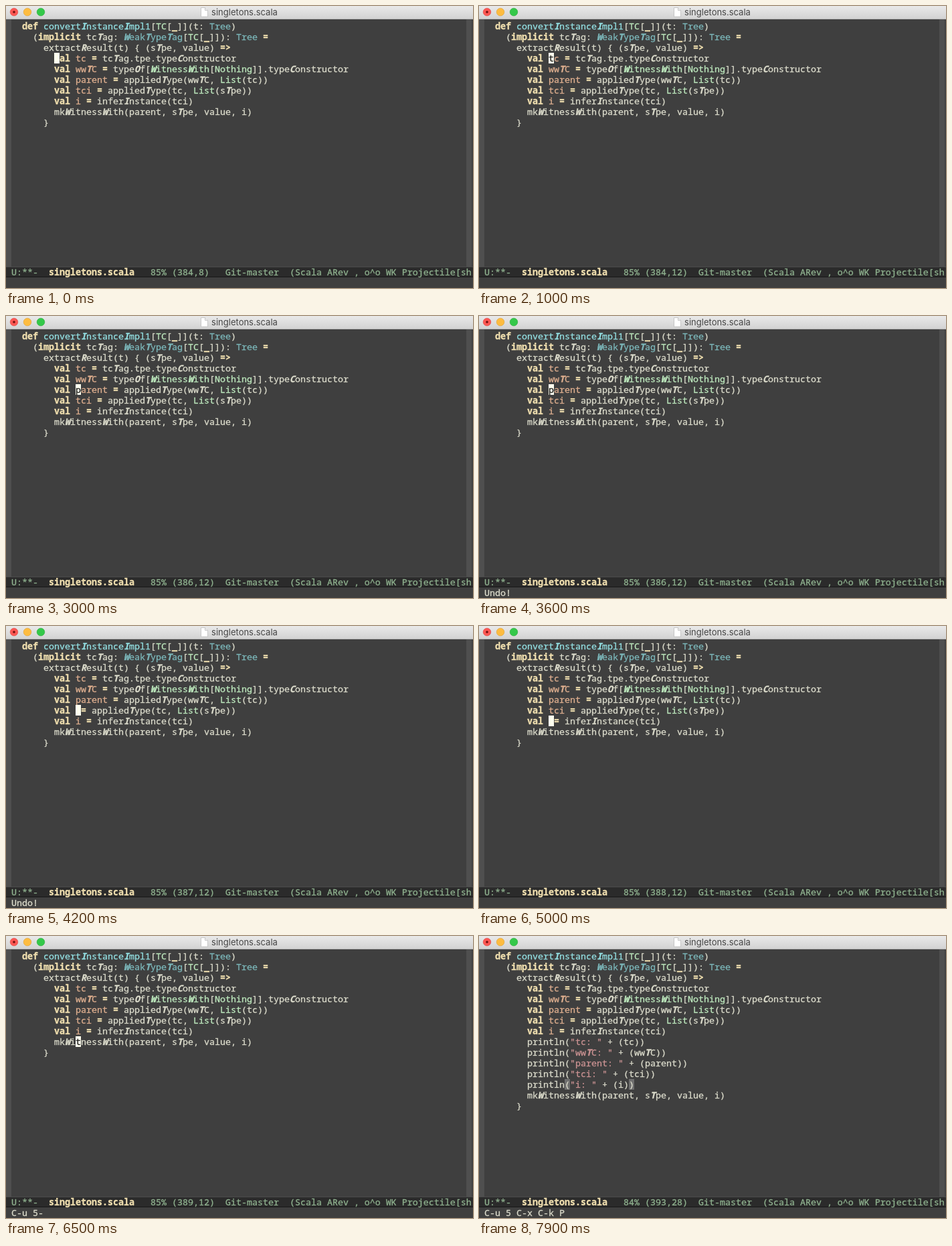
These frames come from a looping animation (698 px wide and 422 px high, 8000 ms). An HTML page:

```html
<!DOCTYPE html>
<html lang="en">
<head>
<meta charset="utf-8">
<title>singletons.scala</title>
<style>
html, body { margin: 0; width: 100%; height: 100%; overflow: hidden; background: #3f3f3f; }
svg { display: block; }
#screen text {
  font: 13.333px "Noto Sans Mono", "DejaVu Sans Mono", monospace;
  white-space: pre; color: #dcdccc;
  fill: currentColor; stroke: currentColor; stroke-width: .3;
}
#screen .k { color: #f0dfaf; font-weight: 700; }
#screen .f { color: #93e0e3; }
#screen .t { color: #7cb8bb; }
#screen .c { color: #bfebbf; }
#screen .v { color: #dfaf8f; }
#screen .s { color: #cc9393; }
#screen .g { font-weight: 700; font-style: italic; }
#screen .m { color: #8fb28f; }
#screen .cur { color: #1c1c1c; }
#screen .k.cur { color: #ffffef; }
.title { font: 13px Inter, Roboto, sans-serif; fill: #454545; }
</style>
</head>
<body>
<svg width="698" height="422" viewBox="0 0 698 422">
  <defs>
    <linearGradient id="bar" x2="0" y2="1">
      <stop stop-color="#e9e9e9"/><stop offset="1" stop-color="#d2d2d2"/>
    </linearGradient>
  </defs>
  <rect width="698" height="422" fill="#3f3f3f"/>
  <path d="M0 20h8v370h-8zM688 20h8v370h-8z" fill="#4f4f4f"/>
  <rect width="698" height="20" fill="url(#bar)"/>
  <rect y="19" width="698" height="1" fill="#b4b4b4"/>
  <g stroke-width=".6">
    <circle cx="12" cy="9" r="5.8" fill="#fc5753" stroke="#df4744"/>
    <circle cx="32" cy="9" r="5.8" fill="#fdbc40" stroke="#de9f34"/>
    <circle cx="52" cy="9" r="5.8" fill="#34c84a" stroke="#27aa35"/>
  </g>
  <circle cx="12" cy="9" r="1.8" fill="#6b0f0c"/>
  <path d="M291.5 2.5h6l4 4v9.5h-10z" fill="#fff" stroke="#bdbdbd" stroke-width=".8"/>
  <path d="M297.5 2.5v4h4" fill="#eee" stroke="#bdbdbd" stroke-width=".8"/>
  <text class="title" x="356.5" y="14" text-anchor="middle">singletons.scala</text>
  <rect y="390" width="698" height="16" fill="#2b2b2b"/>
  <rect y="390" width="698" height="1" fill="#4b4b4b"/>
  <rect y="405" width="698" height="1" fill="#171717"/>
  <g id="screen"></g>
</svg>
<script>
const LOOP = 8000, CELL = 8, ROW = 16, LEFT = 8, TOP = 22, FIRST = 381;
const screenEl = document.getElementById('screen');

const head = [
  '  def convertInstanceImpl1[TC[_]](t: Tree)',
  '    (implicit tcTag: WeakTypeTag[TC[_]]): Tree =',
  '      extractResult(t) { (sTpe, value) =>',
  '        val tc = tcTag.tpe.typeConstructor',
  '        val wwTC = typeOf[WitnessWith[Nothing]].typeConstructor',
  '        val parent = appliedType(wwTC, List(tc))',
  '        val tci = appliedType(tc, List(sTpe))',
  '        val i = inferInstance(tci)'
];
const prints = ['tc', 'wwTC', 'parent', 'tci', 'i']
  .map(n => `        println("${n}: " + (${n}))`);
const tail = ['        mkWitnessWith(parent, sTpe, value, i)', '      }'];

const rules = [
  [/\b(def|implicit|val)\b|=>|[=_]/g, 'k'],
  [/\b(Tree|WeakTypeTag)\b/g, 't'],
  [/\b(TC|List|WitnessWith|Nothing)\b/g, 'c'],
  [/(?<=def )\w+/g, 'f'],
  [/(?<=val )\w+/g, 'v'],
  [/"[^"]*"/g, 's']
];
const humps = /(?<=[a-z])[A-Z]|\b[A-Z](?=[A-Za-z]*[a-z][A-Z])/g;

// Each step changes part of the editor state from its time on.
const steps = [
  [0, { line: 384, col: 8, cut: 0, echo: '', done: false, parens: false, caret: true }],
  [600, { col: 11 }],
  [900, { col: 12 }]
];
const grab = (line, kill, undo, down) => steps.push(
  [kill, { cut: line, echo: '' }],
  [undo, { echo: 'Undo!' }],
  [undo + 100, { cut: 0 }],
  [down, { line: line + 1, echo: '' }]
);
grab(384, 1200, 1600, 2200);
grab(385, 2400, 2600, 2900);
grab(386, 3200, 3500, 3800);
grab(387, 4000, 4200, 4600);
grab(388, 4900, 5200, 5600);
steps.push(
  [6000, { echo: 'C-u-' }],
  [6300, { echo: 'C-u 5-' }],
  [6800, { echo: 'C-u 5 C-x-' }],
  [7100, { echo: 'C-u 5 C-x C-k-' }],
  [7400, { echo: 'C-u 5 C-x C-k P', line: 393, col: 28, done: true }],
  [7600, { parens: true }],
  [7900, { caret: false }]
);

const esc = s => s.replace(/&/g, '&amp;').replace(/</g, '&lt;').replace(/>/g, '&gt;');
const text = (s, col, top, cls = '') =>
  `<text x="${LEFT + col * CELL}" y="${top + 12.5}" class="${cls}">${esc(s)}</text>`;
const block = (col, top, fill) =>
  `<rect x="${LEFT + col * CELL}" y="${top}" width="${CELL}" height="${ROW}" fill="${fill}"/>`;

function codeLine(src, top, caretCol) {
  const cls = Array(src.length).fill('');
  for (const [re, name] of rules)
    for (const m of src.matchAll(re)) cls.fill(name, m.index, m.index + m[0].length);
  for (const m of src.matchAll(humps)) cls[m.index] += ' g';
  if (caretCol >= 0 && caretCol < src.length) cls[caretCol] += ' cur';
  let out = '';
  for (let a = 0, b; a < src.length; a = b) {
    for (b = a + 1; b < src.length && cls[b] === cls[a];) b++;
    const run = src.slice(a, b);
    const pad = run.search(/\S/);
    if (pad >= 0) out += text(run.slice(pad), a + pad, top, cls[a]);
  }
  return out;
}

function render(s) {
  const lines = [...head, ...(s.done ? prints : []), ...tail];
  if (s.cut) lines[s.cut - FIRST] = lines[s.cut - FIRST].replace(/val \w+/, 'val ');
  const rowTop = n => TOP + (n - FIRST) * ROW;
  let out = '';
  if (s.parens) out += block(15, rowTop(s.line), '#6f6f6f') + block(27, rowTop(s.line), '#6f6f6f');
  if (s.caret) out += block(s.col, rowTop(s.line), '#ffffef');
  lines.forEach((l, i) => {
    out += codeLine(l, TOP + i * ROW, s.caret && s.line === FIRST + i ? s.col : -1);
  });
  const place = `${s.done ? 84 : 85}% (${s.line},${s.col})`.padEnd(14);
  out += text('U:**-', 0, 390, 'm') + text('singletons.scala', 7, 390, 'k') +
    text(place + 'Git-master  (Scala ARev , o^o WK Projectile[sh', 26, 390, 'm') +
    text(s.echo, 0, 406);
  screenEl.innerHTML = out;
}

let shown = -1;
function update(ms) {
  const t = ms % LOOP;
  const count = steps.filter(([at]) => at <= t).length;
  if (count !== shown) {
    shown = count;
    render(Object.assign({}, ...steps.slice(0, count).map(([, change]) => change)));
  }
}

const start = performance.now();
function tick() {
  update(performance.now() - start);
  requestAnimationFrame(tick);
}
tick();
</script>
</body>
</html>
```
